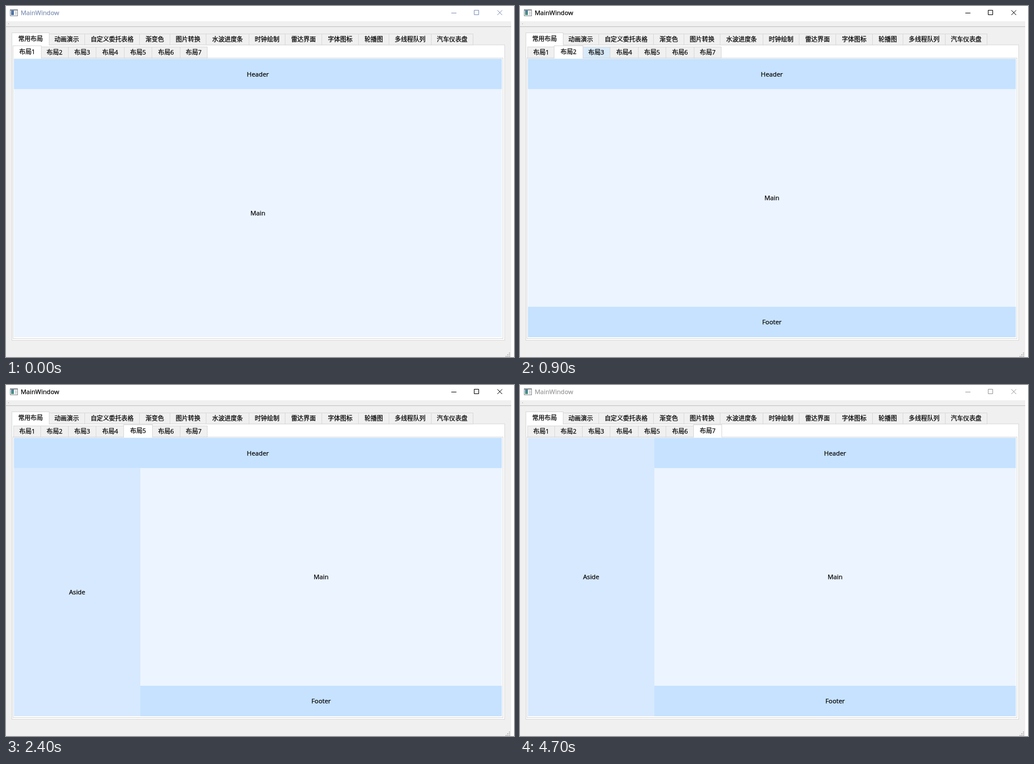
An HTML page with a canvas that plays this animation: 900x622 px, repeating every 4.8 s.

```html
<!DOCTYPE html>
<html lang="zh-CN">
<head>
<meta charset="utf-8">
<title>MainWindow</title>
<style>
html, body { margin: 0; width: 100%; height: 100%; overflow: hidden; background: #fff; }
canvas { display: block; }
</style>
</head>
<body>
<canvas id="stage" width="900" height="622"></canvas>
<script>
const ctx = document.getElementById('stage').getContext('2d');
const LOOP = 4800;
const FONT = '"Open Sans", "Noto Sans CJK SC", "Noto Sans CJK", sans-serif';
const EDGE = '#d9d9d9', FACE = '#f0f0f0';
const HEADER = '#c6e2ff', ASIDE = '#d7e9fe', MAIN = '#ecf4ff';
const L = 14, T = 93.5, R = 878.5, B = 587, BAR = 54, SIDE = 238;

const pages = ['常用布局', '动画演示', '自定义委托表格', '渐变色', '图片转换', '水波进度条',
  '时钟绘制', '雷达界面', '字体图标', '轮播图', '多线程队列', '汽车仪表盘'];
const pageEdges = [11, 75, 139, 236, 290, 354, 430, 494, 559, 624, 678, 753, 827];
const layouts = [1, 2, 3, 4, 5, 6, 7].map(n => '布局' + n);
const layoutEdges = [13, 61, 110, 159, 209, 258, 308, 356];

// [start time, selected layout, hovered layout]
const steps = [
  [0, 1, 0], [300, 1, 2], [500, 2, 0], [800, 2, 3], [1000, 3, 0], [1200, 3, 4],
  [1400, 4, 0], [1700, 4, 5], [2400, 5, 0], [2700, 5, 6], [3100, 6, 0],
  [3400, 6, 7], [3700, 7, 0]
];

function rect(x, y, x2, y2, fill) {
  ctx.fillStyle = fill;
  ctx.fillRect(x, y, x2 - x, y2 - y);
}

function frame(x, y, x2, y2, fill) {
  rect(x, y, x2, y2, EDGE);
  rect(x + 1, y + 1, x2 - 1, y2 - 1, fill);
}

// A hairline outline gives the text its slightly heavier weight.
function text(s, x, y, size, align = 'center', color = '#000') {
  ctx.font = size + 'px ' + FONT;
  ctx.textAlign = align;
  ctx.fillStyle = ctx.strokeStyle = color;
  ctx.lineWidth = 0.25;
  ctx.fillText(s, x, y);
  ctx.strokeText(s, x, y);
}

function panel(name, x, y, x2, y2, fill) {
  rect(x, y, x2, y2, fill);
  text(name, (x + x2) / 2, Math.round((y + y2) / 2 + 4), 11.3);
}

function tabs(names, edges, top, bottom, base, selected, hovered) {
  names.forEach((name, i) => {
    const x = edges[i], x2 = edges[i + 1] + 1;
    frame(x, top, x2, bottom + 1, i === hovered ? '#d8eaf9' : FACE);
    if (i !== selected) text(name, (x + x2) / 2, base, 10.9);
  });
  const x = edges[selected] - 1, x2 = edges[selected + 1] + 2;
  frame(x, top - 2, x2, bottom + 1, '#fff');
  rect(x + 1, bottom - 1, x2 - 1, bottom + 2, '#fff');
  text(names[selected], (x + x2) / 2, base - 1, 10.9);
}

function titleBar(t) {
  const color = t < 100 ? '#7f92b4' : t < 4700 ? '#000' : '#999';
  rect(0, 0, 900, 27, '#fff');
  rect(7, 6, 21, 18, '#858b90');
  rect(8, 8, 20, 17, '#fff');
  const shade = ctx.createLinearGradient(0, 8, 0, 16);
  shade.addColorStop(0, t < 100 ? '#5878b4' : '#4b7fa5');
  shade.addColorStop(1, t < 100 ? '#436fa0' : '#459675');
  rect(9, 8, 14, 16, shade);
  rect(16, 9, 19, 16, '#d4d7da');
  text('MainWindow', 26, 16, 11.2, 'left', color);

  ctx.lineWidth = 1;
  ctx.beginPath();
  ctx.moveTo(789, 12.5);
  ctx.lineTo(798, 12.5);
  ctx.rect(829.5, 7.5, 8, 8);
  ctx.moveTo(870.5, 7.5);
  ctx.lineTo(879, 16);
  ctx.moveTo(879, 7.5);
  ctx.lineTo(870.5, 16);
  ctx.stroke();
}

function layout(n) {
  const left = n > 2 ? SIDE : L;
  const top = n === 3 ? T : T + BAR;
  const hasFooter = n === 2 || n === 5 || n === 7;
  const bottom = hasFooter ? B - BAR : B;
  if (n > 2) panel('Aside', L, n === 4 || n === 5 ? top : T, SIDE, B, ASIDE);
  if (n !== 3) panel('Header', n > 5 ? SIDE : L, T, R, T + BAR, HEADER);
  panel('Main', left, top, R, bottom, MAIN);
  if (hasFooter) panel('Footer', left, bottom, R, B, HEADER);
}

function draw(t) {
  const [, selected, hovered] = steps.findLast(s => s[0] <= t);
  rect(0, 0, 900, 622, '#fff');
  rect(0, 27, 895, 622, FACE);
  titleBar(t);
  rect(0, 36.2, 895, 37.1, '#b8b8b8');
  rect(4, 31, 5, 32, '#999');

  frame(10, 68.4, 884, 593, '#fff');
  tabs(pages, pageEdges, 49, 68.4, 63, 0, -1);
  frame(12, 91.7, 881, 590, '#fff');
  tabs(layouts, layoutEdges, 72, 91.7, 86, selected - 1, hovered - 1);
  layout(selected);

  // resize grip
  for (let row = 0; row < 3; row++)
    for (let col = 0; col <= row; col++) {
      const x = 891 - col * 3, y = 614 + row * 3;
      rect(x, y, x + 2, y + 2, '#bfbfbf');
    }
}

function tick() {
  draw(performance.now() % LOOP);
  requestAnimationFrame(tick);
}
tick();
</script>
</body>
</html>
```
